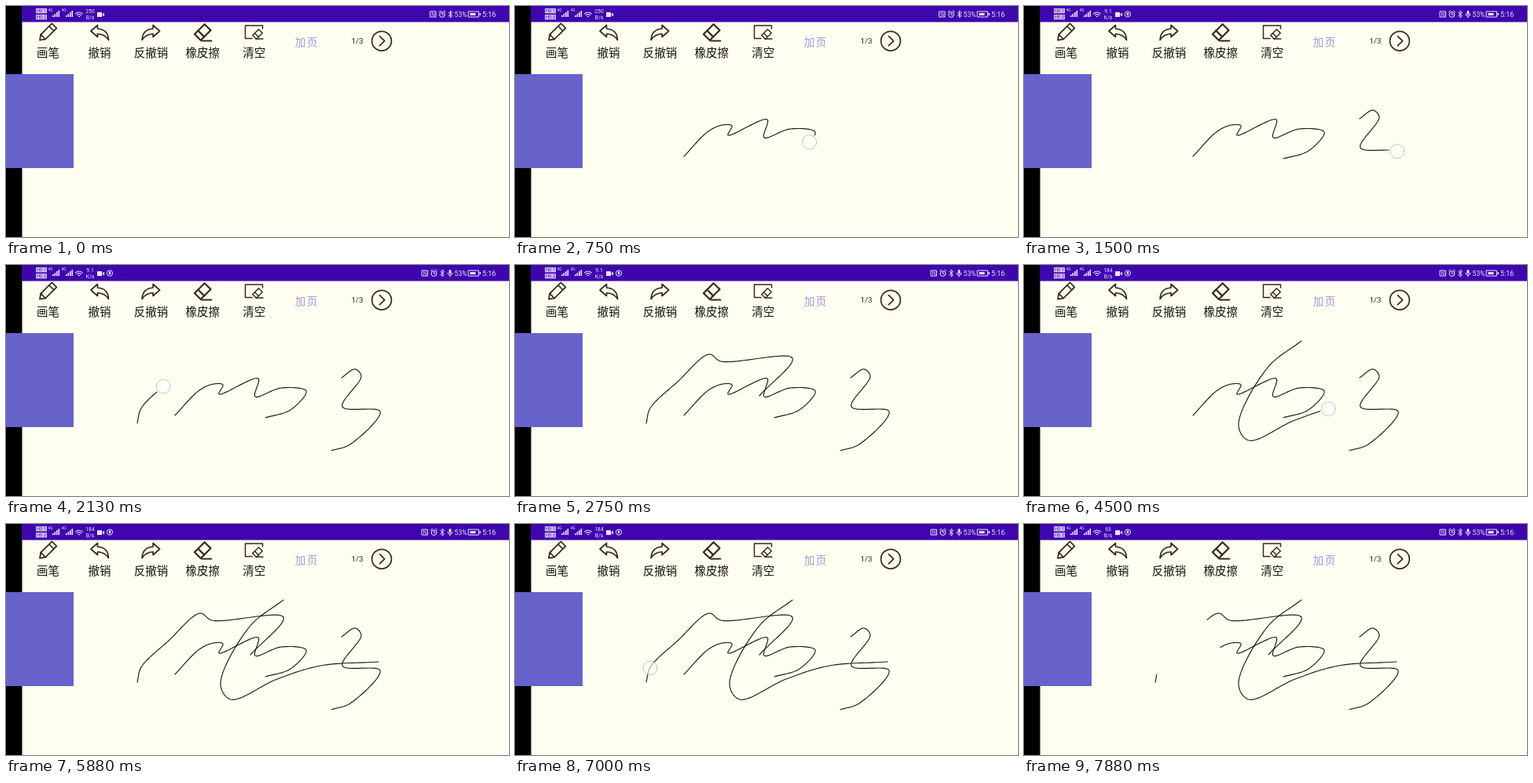
Write an HTML page with a canvas that moves like this. It is 640 px wide and 295 px high and loops after 8 s.

```html
<!DOCTYPE html>
<html lang="zh">
<head>
<meta charset="utf-8">
<title>Drawing board</title>
<style>
html, body { margin: 0; width: 100%; height: 100%; overflow: hidden; background: #fffff1; }
canvas { display: block; width: 100vw; height: 100vh; }
</style>
</head>
<body>
<canvas id="stage" width="640" height="295"></canvas>
<script>
const ctx = document.getElementById('stage').getContext('2d');
const LOOP = 8000, STEP = 125, TAU = Math.PI * 2;
const PAPER = '#fffff1', INK = '#1c1a16', ICON = '#322c1a', BAR = '#3f06ae', LIGHT = '#ebe4f8';
const SANS = '"Noto Sans CJK SC", "Noto Sans CJK", "Noto Sans", sans-serif';
const LATIN = 'Roboto, "Noto Sans", sans-serif';

const mix = (a, b, u) => [a[0] + (b[0] - a[0]) * u, a[1] + (b[1] - a[1]) * u];
const gap = (a, b) => Math.hypot(b[0] - a[0], b[1] - a[1]);

// Centripetal Catmull-Rom spline through a few points, with running length
function curve(...p) {
  const ends = [mix(p[1], p[0], 2), ...p, mix(p[p.length - 2], p[p.length - 1], 2)];
  const out = [[...p[0], 0]];
  for (let i = 0; i + 3 < ends.length; i++) {
    const [a, b, c, d] = ends.slice(i, i + 4);
    const k1 = Math.sqrt(gap(a, b)), k2 = k1 + Math.sqrt(gap(b, c)), k3 = k2 + Math.sqrt(gap(c, d));
    for (let n = 1; n <= 16; n++) {
      const k = k1 + (k2 - k1) * n / 16;
      const ab = mix(a, b, k / k1), bc = mix(b, c, (k - k1) / (k2 - k1)), cd = mix(c, d, (k - k2) / (k3 - k2));
      const q = mix(mix(ab, bc, k / k2), mix(bc, cd, (k - k1) / (k3 - k1)), (k - k1) / (k2 - k1));
      const last = out[out.length - 1];
      out.push([...q, last[2] + gap(last, q)]);
    }
  }
  return out;
}

const length = path => path[path.length - 1][2];

function pointAt(path, dist) {
  const i = path.findIndex(q => q[2] >= dist);
  if (i < 0) return path[path.length - 1];
  if (i === 0) return path[0];
  const a = path[i - 1], b = path[i];
  return mix(a, b, (dist - a[2]) / (b[2] - a[2] || 1));
}

const strokes = [
  { start: 125, end: 875, path: curve([215, 192], [246, 160], [264, 152], [276, 153], [271, 165],
    [321, 145], [317, 168], [350, 157], [382, 161], [362, 185], [330, 195]) },
  { start: 1125, end: 1750, path: curve([427, 144], [444, 133], [452, 142], [428, 181], [476, 187], [438, 229], [414, 237]) },
  { start: 2000, end: 2625, path: curve([167, 202], [172, 183], [207, 149], [247, 114], [262, 123], [353, 119], [311, 167]) },
  { start: 4000, end: 4660, path: curve([353, 97], [310, 131], [273, 205], [286, 224], [345, 198], [400, 181], [474, 176]) }
];
const wipe = { start: 7000, end: 7750, path: curve([172, 184], [226, 129], [241, 160], [214, 203]) };

// Toolbar buttons are evenly spaced
const slot = i => 53.4 + 65.6 * i;
const [UNDO, REDO, ERASER] = [1, 2, 3];
const presses = [
  { time: 3000, button: UNDO }, { time: 3250, button: UNDO },
  { time: 3500, button: REDO }, { time: 5375, button: REDO }, { time: 6625, button: ERASER }
];
const history = [...strokes.map(stroke => ({ time: stroke.start, stroke })), ...presses]
  .sort((a, b) => a.time - b.time);

function visibleStrokes(t) {
  const shown = [], undone = [];
  for (const e of history.filter(e => e.time <= t)) {
    if (e.stroke) shown.push(e.stroke);
    else if (e.button === UNDO) undone.push(shown.pop());
    else if (e.button === REDO) shown.push(undone.pop());
  }
  return shown;
}

const progress = (t, s) => Math.min(1, (t - s.start) / (s.end - s.start));

function line(points, width, color) {
  ctx.beginPath();
  for (const [x, y] of points) ctx.lineTo(x, y);
  ctx.lineWidth = width;
  ctx.strokeStyle = color;
  ctx.stroke();
}

function ring(x, y, r, width, color, from = 0, to = TAU) {
  ctx.beginPath();
  ctx.arc(x, y, r, from, to);
  ctx.lineWidth = width;
  ctx.strokeStyle = color;
  ctx.stroke();
}

function box(x, y, w, h, color) {
  ctx.fillStyle = color;
  ctx.fillRect(x, y, w, h);
}

function frame(x, y, w, h, width, color) {
  ctx.lineWidth = width;
  ctx.strokeStyle = color;
  ctx.strokeRect(x, y, w, h);
}

function text(s, x, y, size, color, family = LATIN) {
  ctx.font = `${size}px ${family}`;
  ctx.fillStyle = color;
  ctx.textAlign = 'center';
  ctx.textBaseline = 'middle';
  ctx.fillText(s, x, y);
}

function at(x, y, turn, paint) {
  ctx.save();
  ctx.translate(x, y);
  ctx.rotate(turn * TAU);
  paint();
  ctx.restore();
}

function trace(path, dist, width, color) {
  line([...path.filter(q => q[2] <= dist), pointAt(path, dist)], width, color);
}

function dot(x, y) {
  ctx.beginPath();
  ctx.arc(x, y, 9, 0, TAU);
  ctx.fillStyle = 'rgba(255,255,255,.6)';
  ctx.fill();
  ring(x, y, 9, 1, 'rgba(110,105,125,.4)');
}

function signal() {
  text('4G', -1, -4.5, 5, LIGHT);
  for (let i = 0; i < 4; i++) box(1.5 + i * 2.5, 2 - i * 2, 1.6, 2 + i * 2, LIGHT);
}

function bluetooth() {
  line([[-2.5, -2.5], [2.5, 2], [0, 4.5], [0, -4.5], [2.5, -2], [-2.5, 2.5]], 1, LIGHT);
}

function alarm() {
  ring(0, 0.5, 3.3, 1.1, LIGHT);
  line([[0, -1.5], [0, 0.7], [1.5, 0.7]], 1, LIGHT);
  for (const s of [-1, 1]) line([[s * 2, -4.5], [s * 4, -2.8]], 1, LIGHT);
}

function microphone() {
  line([[0, -3], [0, -0.5]], 2.8, LIGHT);
  ring(0, -0.5, 3, 1, LIGHT, 0, TAU / 2);
  line([[0, 2.5], [0, 4.5]], 1, LIGHT);
}

function speedLabel(t) {
  if (t < 1000) return ['250', 'B/s'];
  if (t < 4000) return ['9.1', 'K/s'];
  return [t < 7375 ? '184' : '63', 'B/s'];
}

function statusBar(t) {
  const recording = t >= 1000;
  box(20, 0, 620, 20.5, BAR);
  for (const n of [1, 2]) {
    box(38, n * 8 - 5, 14, 6.3, '#cfc0ec');
    text('HD ' + n, 45, n * 8 - 1.5, 5.5, BAR);
  }
  for (const x of [57.5, 74.5]) at(x, 10, 0, signal);
  for (const r of [1, 3.5, 6]) ring(93, 14, r, 1.2, LIGHT, -TAU * 0.38, -TAU * 0.12);
  speedLabel(t).forEach((s, i) => text(s, 107, 6.7 + i * 8, 6.8, LIGHT));
  box(116, 8, 6, 6, LIGHT);
  line([[122.5, 11], [124.5, 9], [124.5, 13], [122.5, 11]], 1, LIGHT);
  if (recording) {
    ring(132, 10.5, 3.6, 1, LIGHT);
    box(130.8, 8.5, 2.4, 3.5, LIGHT);
    at(565, 10.5, 0, microphone);
  }
  const right = recording ? 555 : 565.5;
  at(right, 10.5, 0, bluetooth);
  at(right - 10.5, 10.5, 0, alarm);
  frame(right - 25.5, 7, 7, 7, 1, LIGHT);
  text('N', right - 22, 10.8, 6.5, LIGHT);
  text('53%', 578.5, 11.2, 8.5, LIGHT);
  frame(588.5, 7, 13, 7, 1, LIGHT);
  box(590.5, 9, 7, 3, LIGHT);
  box(602.5, 9, 1.5, 3, LIGHT);
  text('5:16', 614.7, 11.2, 9, LIGHT);
}

function pencil() {
  frame(-4.2, -12, 8.4, 20, 1.8, ICON);
  line([[-4.2, -7], [4.2, -7]], 1.5, ICON);
  line([[-4.2, 8], [0, 14], [4.2, 8]], 1.8, ICON);
}

function arrow(flip) {
  ctx.scale(flip, 1);
  ctx.beginPath();
  ctx.moveTo(-2.5, 1.5);
  ctx.lineTo(-2.5, 5.5);
  ctx.lineTo(-11, -2);
  ctx.lineTo(-2.5, -9.5);
  ctx.lineTo(-2.5, -5);
  ctx.quadraticCurveTo(11, -4, 11.5, 9.5);
  ctx.quadraticCurveTo(7, 2, -2.5, 1.5);
  ctx.lineWidth = 1.7;
  ctx.strokeStyle = ICON;
  ctx.stroke();
}

function rubber(size, width) {
  frame(-size, -size * 0.62, size * 2, size * 1.24, width, ICON);
  line([[-size * 0.3, -size * 0.62], [-size * 0.3, size * 0.62]], width, ICON);
}

function toolbar() {
  at(slot(0) - 0.5, 33.8, 0.125, pencil);
  at(slot(UNDO), 34, 0, () => arrow(1));
  at(slot(REDO), 34, 0, () => arrow(-1));
  at(slot(ERASER), 33.5, -0.125, () => rubber(9, 2.2));
  line([[249, 44.5], [261.5, 44.5]], 1.8, ICON);
  line([[313, 41.5], [304.5, 41.5], [304.5, 25], [326.5, 25], [326.5, 29]], 1.5, ICON);
  at(320, 36, -0.125, () => rubber(5.5, 1.4));
  line([[318, 42], [327, 42]], 1.4, ICON);

  ['画笔', '撤销', '反撤销', '橡皮擦', '清空'].forEach((s, i) => text(s, slot(i), 59, 14.5, '#14120c', SANS));
  [...'加页'].forEach((s, i) => text(s, 374.5 + i * 15, 46.3, 13.5, '#a596dc', SANS));
  text('1/3', 447, 45.3, 9.8, '#2c2818');
  ring(478, 44.7, 12.4, 1.7, ICON);
  line([[475.5, 38.7], [481.7, 44.7], [475.5, 50.7]], 1.7, ICON);
}

function board(t) {
  for (const s of visibleStrokes(t)) {
    const f = progress(t, s), len = length(s.path);
    // Ink trails slightly behind the finger
    trace(s.path, f < 1 ? Math.max(0, f * len - 11) : len, 1.15, INK);
  }
  if (t > wipe.start) trace(wipe.path, progress(t, wipe) * length(wipe.path), 17, PAPER);
}

function touches(t) {
  for (const s of [...strokes, wipe]) {
    if (t < s.start || t >= s.end + STEP) continue;
    const [x, y] = pointAt(s.path, progress(t, s) * length(s.path));
    dot(x, y);
  }
  for (const p of presses) if (t >= p.time - STEP && t < p.time) dot(slot(p.button), 45);
}

function draw(t) {
  ctx.lineCap = ctx.lineJoin = 'round';
  box(0, 0, 640, 295, PAPER);
  board(t);
  box(0, 0, 20.5, 295, '#000');
  statusBar(t);
  toolbar();
  box(0, 87, 86, 120, '#6862cb');
  touches(t);
}

const begin = performance.now();
function tick() {
  const t = (performance.now() - begin) % LOOP;
  draw(Math.floor(t / STEP) * STEP);
  requestAnimationFrame(tick);
}
tick();
</script>
</body>
</html>
```
